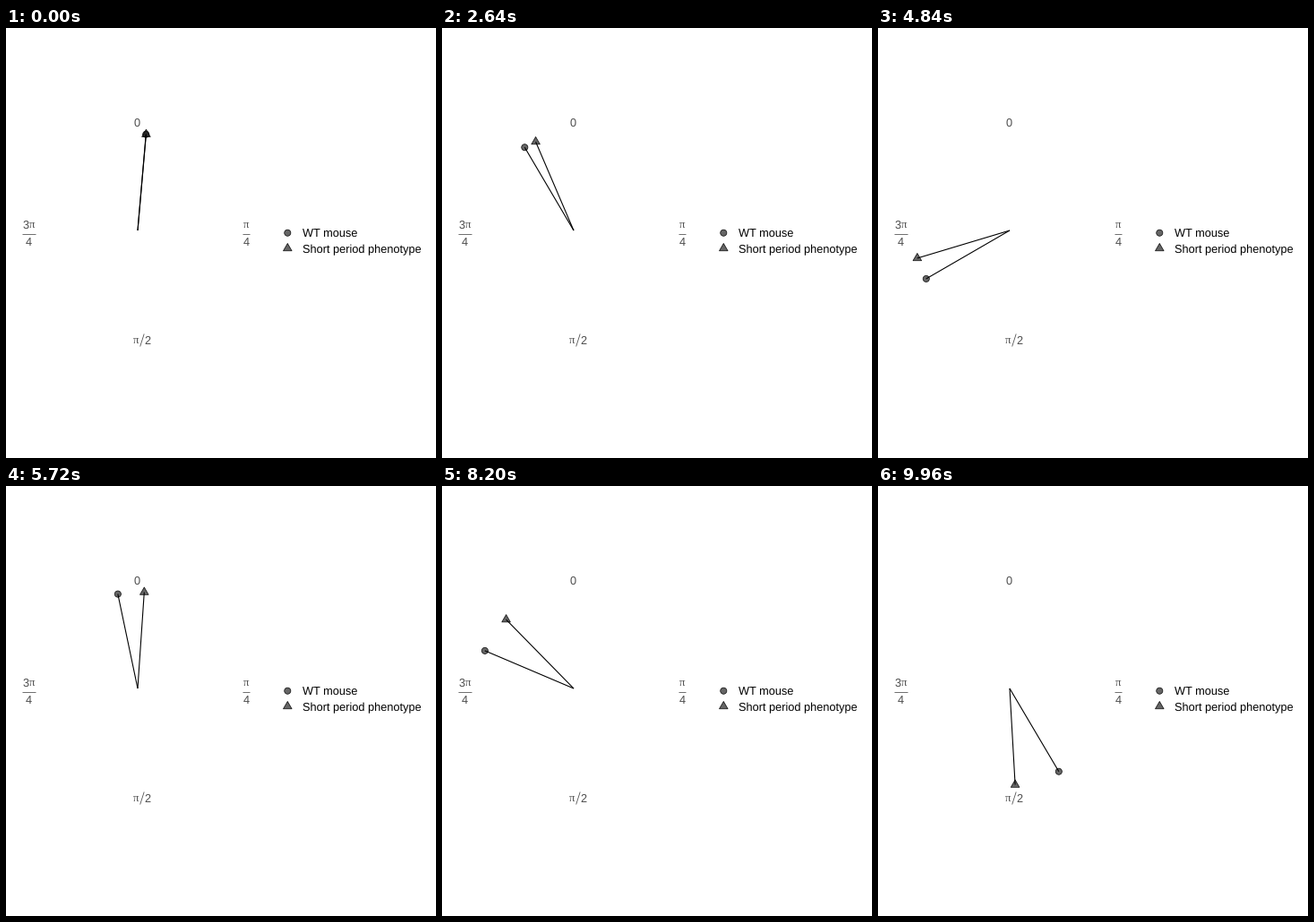
Write a matplotlib script that moves like this. It is 480 px wide and 480 px high and loops after 10 s.

```python
import numpy as np
import matplotlib.pyplot as plt
from matplotlib.animation import FuncAnimation
from matplotlib.patches import Circle, Polygon

SIZE, DPI = 480, 100
FRAMES, INTERVAL = 250, 40
PT = 72 / DPI                       # points per pixel
CENTER, RADIUS = np.array([147.0, 226.0]), 107.7
WT_STEP, SHORT_STEP = 4.9176, 5.027  # degrees per frame
DOT_R = 3.56
TRIANGLE = DOT_R * np.array([[0, -1.5547], [1.3468, 0.7773], [-1.3468, 0.7773]])
GREY = "#4d4d4d"

plt.rcParams["text.hinting"] = "none"
fig = plt.figure(figsize=(SIZE / DPI, SIZE / DPI), dpi=DPI, facecolor="white")
ax = fig.add_axes([0, 0, 1, 1])
ax.set_xlim(0, SIZE)
ax.set_ylim(SIZE, 0)
ax.axis("off")


def label(x, y, text, color=GREY, ha="center", font="Liberation Sans"):
    ax.text(x, y, text, color=color, ha=ha, va="baseline",
            family=font, size=12.8 * PT)


def pi(x, y):
    label(x, y, "π", font="Liberation Serif")


def stroke(xs, ys, color=GREY, width=0.8, **kw):
    return ax.plot(xs, ys, color=color, lw=width * PT,
                   solid_capstyle="butt", **kw)[0]


def marker(shape):
    shape.set(facecolor=(0, 0, 0, 0.6), edgecolor=(0, 0, 0, 0.9),
              linewidth=0.75 * PT, zorder=3)
    return ax.add_patch(shape)


def dot(pos):
    return marker(Circle(pos, DOT_R))


def triangle(pos):
    return marker(Polygon(TRIANGLE + pos, closed=True, joinstyle="round"))


def tip(step, frame):
    angle = np.radians(step * (frame + 1))
    return CENTER + RADIUS * np.array([np.sin(angle), -np.cos(angle)])


# axis labels
label(146.5, 110, "0")
pi(268, 223.4)
stroke([264, 272], [229.5, 229.5])
label(268, 243, "4")
pi(145, 353)
stroke([149.7, 154.2], [355.5, 341.5])
label(158.4, 353, "2")
label(21.8, 223.4, "3")
pi(29, 223.4)
stroke([18, 33], [229.5, 229.5])
label(25.5, 243, "4")

# legend
dot((314.3, 228.7))
triangle((314.3, 246))
label(330.6, 234.2, "WT mouse", "black", "left")
label(330.6, 251.3, "Short period phenotype", "black", "left")

# moving hands
wt_hand, short_hand = (stroke([], [], "black", 1.1, zorder=2) for _ in range(2))
wt_dot = dot(CENTER)
short_tri = triangle(CENTER)


def update(frame):
    wt, short = tip(WT_STEP, frame), tip(SHORT_STEP, frame)
    for hand, end in ((wt_hand, wt), (short_hand, short)):
        hand.set_data([CENTER[0], end[0]], [CENTER[1], end[1]])
    wt_dot.center = tuple(wt)
    short_tri.set_xy(TRIANGLE + short)
    return wt_hand, short_hand, wt_dot, short_tri


anim = FuncAnimation(fig, update, frames=FRAMES, interval=INTERVAL,
                     repeat=True, repeat_delay=0)
plt.show()
```
